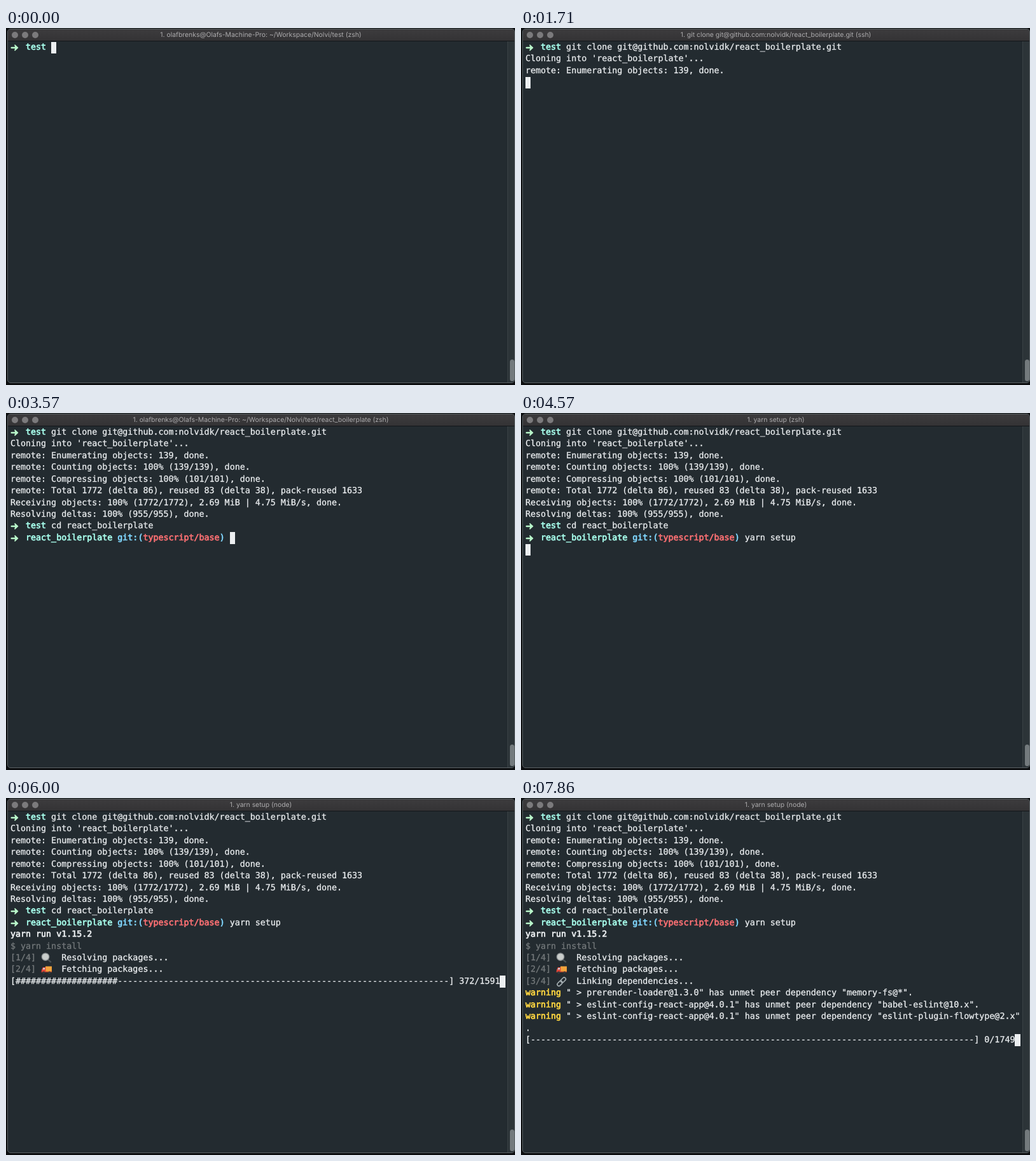
Recreate the animation shown at these times as an HTML page. Size 800x561 px, loop 8 s.

```html
<!DOCTYPE html>
<html lang="en">
<head>
<meta charset="utf-8">
<title>Terminal</title>
<style>
  html, body { margin: 0; width: 100%; height: 100%; overflow: hidden; background: #0c0e10; }
  #stage { position: absolute; left: 0; top: 0; width: 800px; height: 561px; overflow: hidden; background: #0c0e10; }
  #window { position: absolute; left: 2px; top: 1px; width: 798px; height: 557px; box-sizing: border-box;
    border: 1px solid #5a6164; border-radius: 5px; overflow: hidden; background: #232b30; }
  #bar { position: absolute; left: 0; top: 0; width: 100%; height: 18px;
    background: linear-gradient(#3d3c3e, #343335); border-bottom: 1px solid #131619; }
  #bar i { position: absolute; top: 3.5px; width: 10px; height: 10px; border-radius: 50%; background: #7b7a7c; }
  #title { position: absolute; left: 0; top: 2px; width: 801px; height: 19px; text-align: center;
    font: 10.4px/18px Inter, sans-serif; color: #adacae; white-space: pre; text-rendering: geometricPrecision; }
  #track { position: absolute; right: 0; top: 19px; bottom: 0; width: 10px;
    background: #2c3438; border-left: 1px solid #394145; }
  #thumb { position: absolute; left: 2.5px; bottom: 2px; width: 7px; height: 34px; border-radius: 4px; background: #737a7d; }
  #screen { position: absolute; left: 7px; top: 22px; color: #eceff1;
    font: 13.32px/18.42px "DejaVu Sans Mono", monospace; font-variant-ligatures: none;
    text-rendering: geometricPrecision; -webkit-text-stroke: 0.3px; }
  #screen div { position: absolute; left: 0; height: 18.42px; white-space: pre; }
  #screen svg { display: inline-block; height: 18.42px; vertical-align: top; overflow: visible; }
  .cursor { position: relative; top: -0.5px; display: inline-block; width: 8.2px; height: 18.42px;
    vertical-align: top; background: #eceff1; }
  b, .yellow { font-weight: normal; -webkit-text-stroke: 0.7px; }
  .green { color: #b9f6ca; }
  .aqua { color: #a7fdeb; }
  .blue { color: #80d8ff; }
  .red { color: #f96f72; }
  .yellow { color: #ffd740; }
  .grey { color: #74797b; }
</style>
</head>
<body>
<div id="stage">
  <div id="window">
    <div id="bar"><i style="left:5.5px"></i><i style="left:21.5px"></i><i style="left:37.5px"></i></div>
    <div id="track"><div id="thumb"></div></div>
  </div>
  <div id="title"></div>
  <div id="screen"></div>
</div>
<script>
const LOOP = 8000, ROW = 18.42, CELL = 8.019;
const screenEl = document.getElementById('screen');
const titleEl = document.getElementById('title');

const paint = (color, text) => `<span class="${color}">${text}</span>`;
const bold = (color, text) => `<b class="${color}">${text}</b>`;
const icon = (cells, shapes) => `<svg width="${cells * CELL}" viewBox="0 0 ${cells * CELL} ${ROW}">${shapes}</svg>`;

const arrow = icon(1, `<path d="M1.8 9H9" stroke="#b9f6ca" stroke-width="2.6" stroke-linecap="round"/>
  <path d="M7 4.8L11.6 9L7 13.2L8.1 9Z" fill="#b9f6ca" stroke="#b9f6ca" stroke-width="1.4" stroke-linejoin="round"/>`);
const lens = icon(2, `<path d="M10.8 10.8L15.2 14.6" stroke="#4c5255" stroke-width="2.4" stroke-linecap="round"/>
  <circle cx="7" cy="6.6" r="5.7" fill="#c9cdcb" stroke="#8d9294" stroke-width="1.4"/>`);
const truck = icon(2, `<path d="M7 3.5H17V12.5H7Z" fill="#f2a33c"/>
  <path d="M1 9L3 5H7.4V13H.6Z" fill="#e2493b"/><path d="M2.6 8.6L3.9 6H6V8.6Z" fill="#bfdce8"/>
  <path d="M.6 12.2H17" stroke="#a53a30" stroke-width="1.2"/>
  <circle cx="4.2" cy="13.4" r="1.9" fill="#33383b"/><circle cx="13.4" cy="13.4" r="1.9" fill="#33383b"/>`);
const chain = icon(2, `<g fill="none" stroke="#a4adb1" stroke-width="1.6">
  <rect x="-4.6" y="-2.6" width="9.2" height="5.2" rx="2.6" transform="translate(6 11.4) rotate(-45)"/>
  <rect x="-4.6" y="-2.6" width="9.2" height="5.2" rx="2.6" transform="translate(11.4 6) rotate(-45)"/></g>`);

const home = `${arrow}  ${bold('aqua', 'test')} `;
const repo = `${arrow}  ${bold('aqua', 'react_boilerplate')} ` +
  bold('blue', 'git:(') + bold('red', 'typescript/base') + bold('blue', ')') + ' ';
const clone = 'git clone git@github.com:nolvidk/react_boilerplate.git';
const stage = (n, pic, text) => `${paint('grey', `[${n}/4]`)} ${pic}  ${text}...`;
const warn = (pkg, dep) => `${paint('yellow', 'warning')} " &gt; ${pkg}" has unmet peer dependency "${dep}"`;

// Progress line that fills 96 columns
function progress(done, total) {
  const count = `${done}/${total}`, width = 93 - count.length;
  const full = Math.round(width * done / total);
  return `[${'#'.repeat(full)}${'-'.repeat(width - full)}] ${count}`;
}
const typing = (row, prompt, keys) => keys.map(([ms, text]) => [ms, row, prompt + text]);

// [ms, first row, ...lines]; the cursor ends after the last line written
const steps = [
  [0, 0, home],
  ...typing(0, home, [[140, 'g'], [280, 'git c'], [430, clone]]),
  [710, 0, home + clone, "Cloning into 'react_boilerplate'...", ''],
  [1710, 2, 'remote: Enumerating objects: 139, done.', ''],
  [1860, 3, 'remote: Counting objects: 100% (139/139), done.',
    'remote: Compressing objects: 100% (101/101), done.', ''],
  [2000, 5, 'remote: Total 1772 (delta 86), reused 83 (delta 38), pack-reused 1633',
    'Receiving objects:  62% (1099/1772), 1.24 MiB | 2.40 MiB/s'],
  [2140, 6, 'Receiving objects: 100% (1772/1772), 2.69 MiB | 4.75 MiB/s, done.',
    'Resolving deltas:  71% (679/955)'],
  [2290, 7, 'Resolving deltas: 100% (955/955), done.', ''],
  ...typing(8, home, [[2430, ''], [2570, 'c'], [2710, 'cd'], [2860, 'cd r'], [3000, 'cd re'],
    [3140, 'cd react_boilerplate/'], [3290, 'cd react_boilerplate']]),
  [3430, 9, repo],
  ...typing(9, repo, [[3710, 'y'], [3860, 'ya'], [4000, 'yarn'], [4140, 'yarn s'],
    [4290, 'yarn set'], [4430, 'yarn setup']]),
  [4570, 10, ''],
  [4860, 10, bold('', 'yarn run v1.15.2'), ''],
  [5000, 11, paint('grey', '$ yarn install'), ''],
  [5290, 12, stage(1, lens, 'Resolving packages'), ''],
  [5430, 13, '\u02D9 '],
  [5860, 13, stage(2, truck, 'Fetching packages'), progress(96, 1591)],
  ...[[6000, 372], [6140, 655], [6290, 948], [6430, 1236], [6570, 1514]]
    .map(([ms, done]) => [ms, 14, progress(done, 1591)]),
  [6710, 14, stage(3, chain, 'Linking dependencies'), ''],
  [6860, 15, warn('prerender-loader@1.3.0', 'memory-fs@*') + '.',
    warn('eslint-config-react-app@4.0.1', 'babel-eslint@10.x') + '.',
    warn('eslint-config-react-app@4.0.1', 'eslint-plugin-flowtype@2.x'), '.', progress(0, 1749)]
];

const place = '1. olafbrenks@Olafs-Machine-Pro: ~/Workspace/Nolvi/test';
const titles = [
  [0, place + ' (zsh)'],
  [710, `1. ${clone} (zsh)`],
  [1140, `1. ${clone} (ssh)`],
  [2290, place + ' (ssh)'],
  [2430, place + ' (zsh)'],
  [3430, place + '/react_boilerplate (zsh)'],
  [4570, '1. yarn setup (zsh)'],
  [4710, '1. yarn setup (node)']
];

const passed = (list, t) => list.filter(([ms]) => ms <= t);
let shown = '';

function render(t) {
  const done = passed(steps, t), heads = passed(titles, t);
  const key = `${done.length}:${heads.length}`;
  if (key === shown) return;
  shown = key;
  titleEl.textContent = heads[heads.length - 1][1];
  const rows = [];
  let end = 0;
  for (const [, first, ...lines] of done) {
    lines.forEach((line, i) => { rows[first + i] = line; });
    end = first + lines.length - 1;
  }
  rows[end] += '<i class="cursor"></i>';
  screenEl.innerHTML = rows.map((line, i) => `<div style="top:${(i * ROW).toFixed(2)}px">${line}</div>`).join('');
}

const start = performance.now();
function tick() {
  render((performance.now() - start) % LOOP);
  requestAnimationFrame(tick);
}
tick();
</script>
</body>
</html>
```
